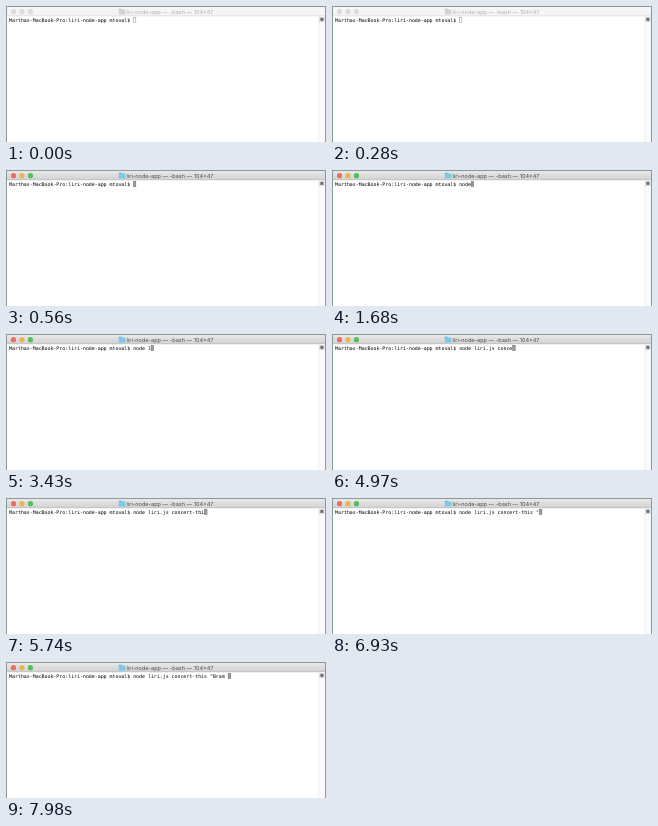
Animation of 320x136 px, one loop 8000 ms. Source, as an HTML page with a canvas:

```html
<!DOCTYPE html>
<html lang="en">
<head>
<meta charset="utf-8">
<title>Terminal</title>
<style>
html, body { margin: 0; width: 320px; height: 136px; overflow: hidden; background: #fff; }
canvas { display: block; }
</style>
</head>
<body>
<canvas id="stage" width="320" height="136"></canvas>
<script>
const ctx = document.getElementById('stage').getContext('2d');
const LOOP = 8000, FOCUS_AT = 560, KEY_GAP = 70;
const LEFT = 3.1, CELL = 2.964;
const PROMPT = 'Marthas-MacBook-Pro:liri-node-app mtoval$ ';
const TITLE = 'liri-node-app — -bash — 104×47';

// A run of keys: when it starts, what is typed, time between keys.
const run = (at, text, gap = KEY_GAP) => ({ at, text, gap });
const RUNS = [
  run(1330, 'nod'), run(1680, 'e ', 770),
  run(3430, 'lir'), run(3780, 'i.js ', 0),
  run(4620, 'conc', 45), run(4970, 'ert', 105),
  run(5460, '-'), run(5600, 'thi'), run(5880, 's "', 525),
  run(7280, 'Bram ', 175)
];

function typedAt(t) {
  return RUNS.map(({ at, text, gap }) =>
    [...text].filter((_, i) => t >= at + i * gap).join('')).join('');
}

function box(x, y, w, h, fill) {
  ctx.fillStyle = fill;
  ctx.fillRect(x, y, w, h);
}

function dot(x, fill) {
  ctx.beginPath();
  ctx.arc(x, 5.7, 2.6, 0, Math.PI * 2);
  ctx.fillStyle = fill;
  ctx.fill();
}

function folder(active) {
  box(112.8, 2.7, 3, 2, active ? '#62b5da' : '#cbcbcb');
  box(112.8, 3.5, 6.6, 5, active ? '#7cc8ea' : '#d3d3d3');
}

function titleBar(active) {
  const shade = ctx.createLinearGradient(0, 1, 0, 10);
  shade.addColorStop(0, active ? '#e9e9e9' : '#f6f6f6');
  shade.addColorStop(1, active ? '#d1d1d1' : '#f4f4f4');
  box(1, 1, 318, 9, shade);
  box(1, 9.6, 318, 0.6, active ? '#b4b4b4' : '#d2d2d2');

  const lights = active ? ['#ea6c62', '#e8b750', '#55bd59'] : Array(3).fill('#dcdcdc');
  lights.forEach((fill, i) => dot(7.5 + i * 8.47, fill));

  folder(active);
  ctx.font = '5.55px Inter, Roboto, sans-serif';
  ctx.fillStyle = active ? '#505050' : '#b4b4b4';
  ctx.fillText(TITLE, 120.6, 7.7);
}

function scrollBar() {
  box(312.6, 10.2, 6.4, 126, '#fafafa');
  box(312.6, 10.2, 0.5, 126, '#e6e6e6');
  box(313, 10.6, 5.6, 5.6, '#dedede');
  box(314.4, 11.9, 3, 3, '#6e6e6e');
}

function cursor(col, active) {
  const x = LEFT - 0.5 + col * CELL;
  if (active) box(x, 11.2, CELL, 5.5, '#a0a0a0');
  ctx.lineWidth = 0.5;
  ctx.strokeStyle = active ? '#777' : '#929292';
  ctx.strokeRect(x + 0.25, 11.4, CELL - 0.5, 5.2);
}

function draw(t) {
  const active = t >= FOCUS_AT;
  const line = PROMPT + typedAt(t);

  box(0, 0, 320, 136, '#8b999b');
  box(1, 1, 318, 135, '#fff');
  titleBar(active);
  scrollBar();
  cursor(line.length, active);

  ctx.font = '4.92px "DejaVu Sans Mono", monospace';
  ctx.fillStyle = '#000';
  ctx.fillText(line, LEFT, 15.6);
}

ctx.textRendering = 'geometricPrecision';
const start = performance.now();
function tick() {
  draw((performance.now() - start) % LOOP);
  requestAnimationFrame(tick);
}
tick();
</script>
</body>
</html>
```
